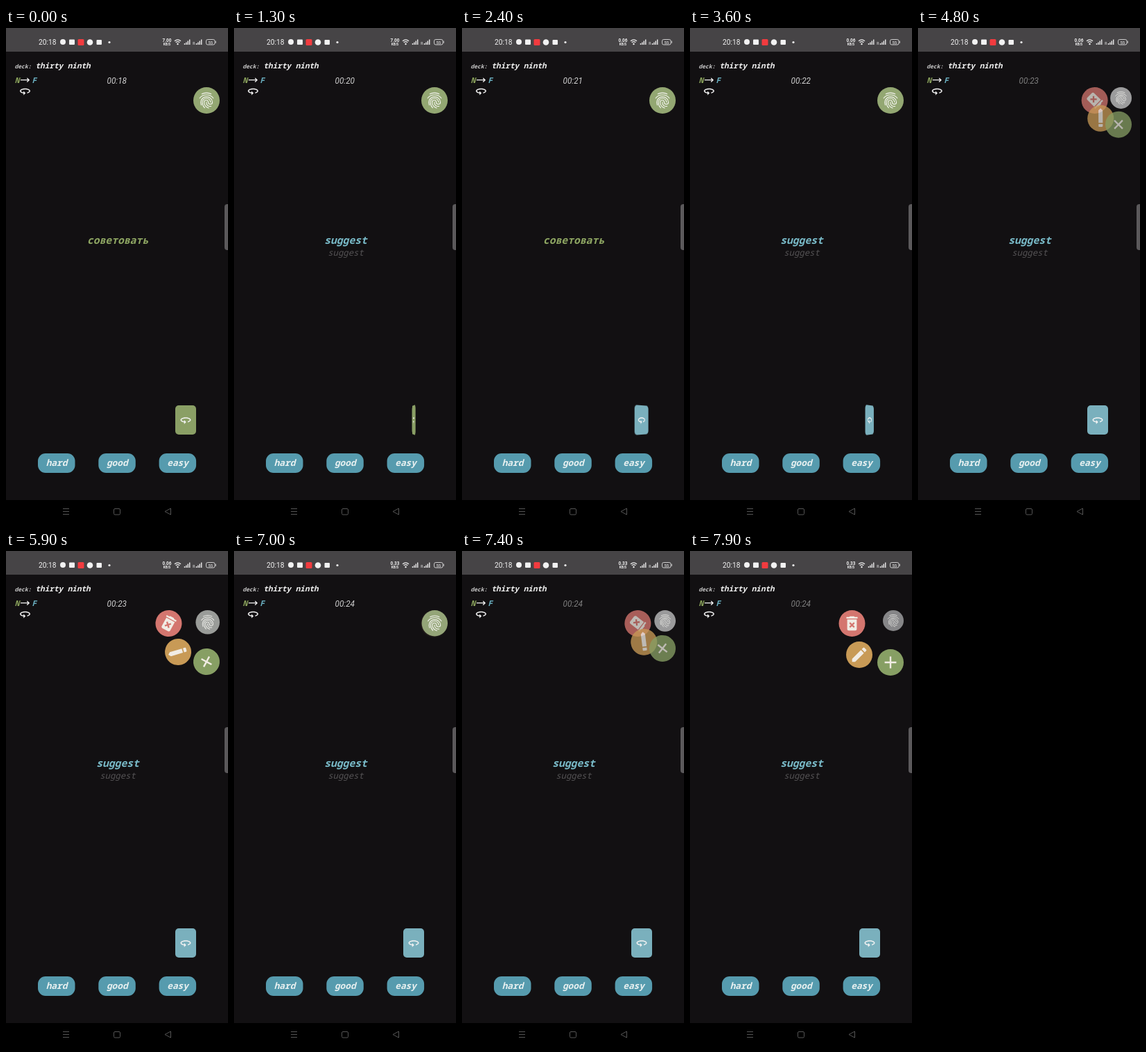
These frames come from a looping animation (320x711 px, 8 s). An HTML page:

```html
<!DOCTYPE html>
<html lang="en">
<head>
<meta charset="utf-8">
<title>Flash cards</title>
<style>
html, body { margin: 0; width: 320px; height: 711px; overflow: hidden; background: #121012; }
svg { display: block; }
#card { position: absolute; left: 244px; top: 542px; width: 30px; height: 42px; border-radius: 5px; }
#card svg { position: absolute; left: 6px; top: 11.5px; }
.mono { font-family: "Noto Sans Mono", "DejaVu Sans Mono", monospace; font-style: italic; font-weight: 600; }
.ui { font-family: Roboto, sans-serif; }
.mid { text-anchor: middle; }
.thin { font-weight: 500; }
</style>
</head>
<body>
<svg width="320" height="711" viewBox="0 0 320 711">
  <defs>
    <path id="turn" d="M12 7C6.48 7 2 9.24 2 12c0 2.24 2.94 4.13 7 4.77V20l4-4-4-4v2.73c-3.15-.56-5-1.9-5-2.73 0-1.06 3.04-3 8-3s8 1.94 8 3c0 .73-1.46 1.89-4 2.53v2.05c3.53-.77 6-2.53 6-4.58 0-2.76-4.48-5-10-5z"/>
    <g id="bars"><path d="M0 8V6M2.4 8V4.5M4.8 8V2.5M7.2 8V.5" stroke="#eee" stroke-width="1.4"/></g>
  </defs>

  <!-- status bar -->
  <rect width="320" height="34" fill="#464446"/>
  <g fill="#f2f2f2" class="ui">
    <text x="47" y="24" font-size="10.2">20:18</text>
    <circle cx="82" cy="20" r="4"/>
    <rect x="91" y="16.5" width="8" height="7.5" rx="1"/>
    <rect x="103.5" y="16" width="9" height="9" rx="1.5" fill="#f23b3f"/>
    <circle cx="121" cy="20.5" r="4.3"/>
    <rect x="130.5" y="17" width="7.5" height="7" rx="1"/>
    <circle cx="149" cy="20.5" r="1.6"/>
    <g class="mid" font-weight="700">
      <text id="speed" x="232" y="20" font-size="6.4"></text>
      <text x="232" y="25" font-size="4.6">KB/S</text>
    </g>
    <path d="M243 18.7q4.5-3.6 9 0M244.7 20.8q2.8-2.2 5.6 0" fill="none" stroke="#eee" stroke-width="1.3"/>
    <circle cx="247.5" cy="23" r="1.2"/>
    <use href="#bars" x="257.5" y="16"/>
    <text x="269.3" y="24" font-size="5">R</text>
    <use href="#bars" x="274.5" y="16"/>
    <rect x="288.5" y="16.5" width="12.5" height="7.5" rx="2.2" fill="none" stroke="#ddd" stroke-width=".9"/>
    <path d="M302.2 18.6v3.2" stroke="#ddd"/>
    <text x="294.8" y="22.5" font-size="6" class="mid">55</text>
  </g>

  <!-- header -->
  <g class="mono" fill="#f0f0f0">
    <text x="12.5" y="58" font-size="8" fill="#ccc">deck:</text>
    <text x="42.5" y="58" font-size="11">thirty ninth</text>
    <text x="12.8" y="79" font-size="11" fill="#8fa85f">N</text>
    <text x="37.5" y="79" font-size="11" fill="#6db4c6">F</text>
  </g>
  <path d="M21 74.7h12M30.3 72l2.9 2.7-2.9 2.7" fill="none" stroke="#f2f2f2" stroke-width="1.3"/>
  <use href="#turn" fill="#f2f2f2" transform="translate(18.5 81.5) scale(.75)"/>
  <text id="clock" class="ui" x="145.5" y="80.3" font-size="11.8" font-style="italic"></text>

  <!-- word -->
  <g class="mono mid">
    <text id="front" x="161" y="309.5" font-size="14.7" fill="#8fa763">советовать</text>
    <g id="back">
      <text x="161" y="309.5" font-size="14.7" fill="#79bac8">suggest</text>
      <text x="161" y="327" font-size="12.3" fill="#555355" class="thin">suggest</text>
    </g>
  </g>

  <!-- answers -->
  <g id="answers" class="mono mid" font-size="12.8"></g>

  <!-- round menu -->
  <g id="menu" fill="#f1ece4">
    <g><circle r="19" fill="#d4766f"/><path transform="scale(1.15) translate(-12 -12)" d="M6 19c0 1.1.9 2 2 2h8c1.1 0 2-.9 2-2V7H6v12zm2.46-7.12 1.41-1.41L12 12.59l2.12-2.12 1.41 1.41L13.41 14l2.12 2.12-1.41 1.41L12 15.41l-2.12 2.12-1.41-1.41L10.59 14l-2.13-2.12zM15.5 4l-1-1h-5l-1 1H5v2h14V4z"/></g>
    <g><circle r="19" fill="#c89a56"/><path transform="scale(1.15) translate(-12 -12)" d="M3 17.25V21h3.75L17.81 9.94l-3.75-3.75L3 17.25zM20.71 7.04c.39-.39.39-1.02 0-1.41l-2.34-2.34c-.39-.39-1.02-.39-1.41 0l-1.83 1.83 3.75 3.75 1.83-1.83z"/></g>
    <g><circle r="19" fill="#879f64"/><path transform="scale(1.2)" d="M7 1H1v6h-2V1h-6v-2h6v-6h2v6h6z"/></g>
  </g>
  <g id="finger">
    <circle r="19"/>
    <path transform="scale(1.15) translate(-12 -12)" fill="none" stroke="#f4f4f0" stroke-linecap="round"
      d="M6.2 4C9.5 2.1 14.5 2.1 17.8 4M3.5 9.2C7.5 3.6 16.5 3.6 20.5 9.2M14.8 21.5C13.2 21 12.2 20.5 11.2 19.5 9.9 18.2 9 16.5 9 14.3c0-1.4 1.2-2.5 2.6-2.5s2.6 1.1 2.6 2.5 1.2 2.4 2.6 2.4 2.6-1.1 2.6-2.4c0-3.8-3.3-6.8-7.3-6.8-2.8 0-5.4 1.6-6.6 4-.9 1.9-.8 4 0 6.3M9.7 21.3C7.7 19.2 6.8 17 6.8 14.3c0-2.7 2.3-4.9 5.1-4.9s5 2.1 5.1 4.7M11.8 14.2c0 3.7 2.4 5.7 5.9 5.1"/>
  </g>

  <rect x="315" y="253" width="9" height="66" rx="4" fill="#5b595b"/>

  <!-- navigation bar -->
  <rect y="678" width="320" height="33"/>
  <g fill="none" stroke="#555" stroke-width="1">
    <path d="M82 690.5h9M82 694.5h9M82 698.5h9M237.5 690v9l-8.5-4.5z"/>
    <rect x="155.5" y="690.5" width="9" height="8.5" rx="1.5"/>
  </g>
</svg>
<div id="card"><svg width="18" height="18" viewBox="0 0 24 24"><use href="#turn" fill="#f2f2f2"/></svg></div>

<script>
const $ = id => document.getElementById(id);
const ramp = (t, start, span) => Math.min(1, Math.max(0, (t - start) / span));
const easeOut = u => 1 - (1 - u) ** 2;

$('answers').innerHTML = ['hard', 'good', 'easy'].map((word, i) => {
  const x = 46 + i * 87.3;
  return `<rect x="${x}" y="611" width="53.5" height="28" rx="11" fill="#569bae"/>
    <text x="${x + 27}" y="629.3" fill="#e9f1f1">${word}</text>`;
}).join('');

// Three flips: to the back, to the front, to the back again
const FLIPS = [960, 2195, 3115], FLIP = 765;
const swing = (t, f) => f(t, FLIPS[0]) - f(t, FLIPS[1]) + f(t, FLIPS[2]);

const TICKS = [200, 1200, 2200, 3200, 4200, 6500];
const TINTS = [[0, 147, 167, 114], [.45, 154, 155, 155], [.9, 156, 156, 157], [1, 134, 134, 136]];
const items = [...$('menu').children];
const REACH = [[-55.5, 0], [-45, 45], [0, 56]];

function tint(q) {
  const i = q < .45 ? 0 : q < .9 ? 1 : 2;
  const [a, b] = [TINTS[i], TINTS[i + 1]];
  const u = (q - a[0]) / (b[0] - a[0]);
  return `rgb(${a.slice(1).map((v, k) => v + (b[k + 1] - v) * u)})`;
}

function draw(t) {
  $('speed').textContent = t < 2200 ? '7.00' : t < 6400 ? '0.06' : '0.33';

  $('clock').textContent = '00:' + (18 + TICKS.filter(s => t >= s).length);
  const paused = ramp(t, 4400, 250) - ramp(t, 5700, 180) + ramp(t, 7050, 250);
  const grey = 208 - 82 * paused;
  $('clock').setAttribute('fill', `rgb(${grey},${grey},${grey})`);

  const turned = swing(t, (t, s) => +(t >= s + 100));
  $('front').style.opacity = 1 - turned;
  $('back').style.opacity = turned;

  const angle = 180 * swing(t, (t, s) => ramp(t, s, FLIP));
  const isBack = angle > 90;
  $('card').style.background = isBack ? '#7ab0bd' : '#8a9f65';
  $('card').style.transform = `perspective(320px) rotateY(${(isBack ? 180 : 0) - angle}deg)`;

  const open = ramp(t, 4400, 700) - ramp(t, 5845, 620) + ramp(t, 6985, 700);
  items.forEach((item, i) => {
    const [x, y] = REACH[i];
    const p = i === 1 ? open : Math.min(1, open * 1.08);
    item.setAttribute('transform', `translate(${289 + x * p} ${104 + y * p}) rotate(${315 * (1 - open)})`);
    item.setAttribute('opacity', Math.min(1, open * 1.3));
  });

  const q = easeOut(ramp(t, 4400, 600)) - easeOut(ramp(t, 5780, 350)) + easeOut(ramp(t, 6980, 600));
  const [disc, lines] = $('finger').children;
  $('finger').setAttribute('transform', `translate(${289 + 4 * q} ${104 - 4 * q}) scale(${1 - .21 * q})`);
  disc.setAttribute('fill', tint(q));
  lines.setAttribute('stroke-opacity', 1 - .2 * q);
}

function frame() {
  draw(performance.now() % 8000);
  requestAnimationFrame(frame);
}
frame();
</script>
</body>
</html>
```
